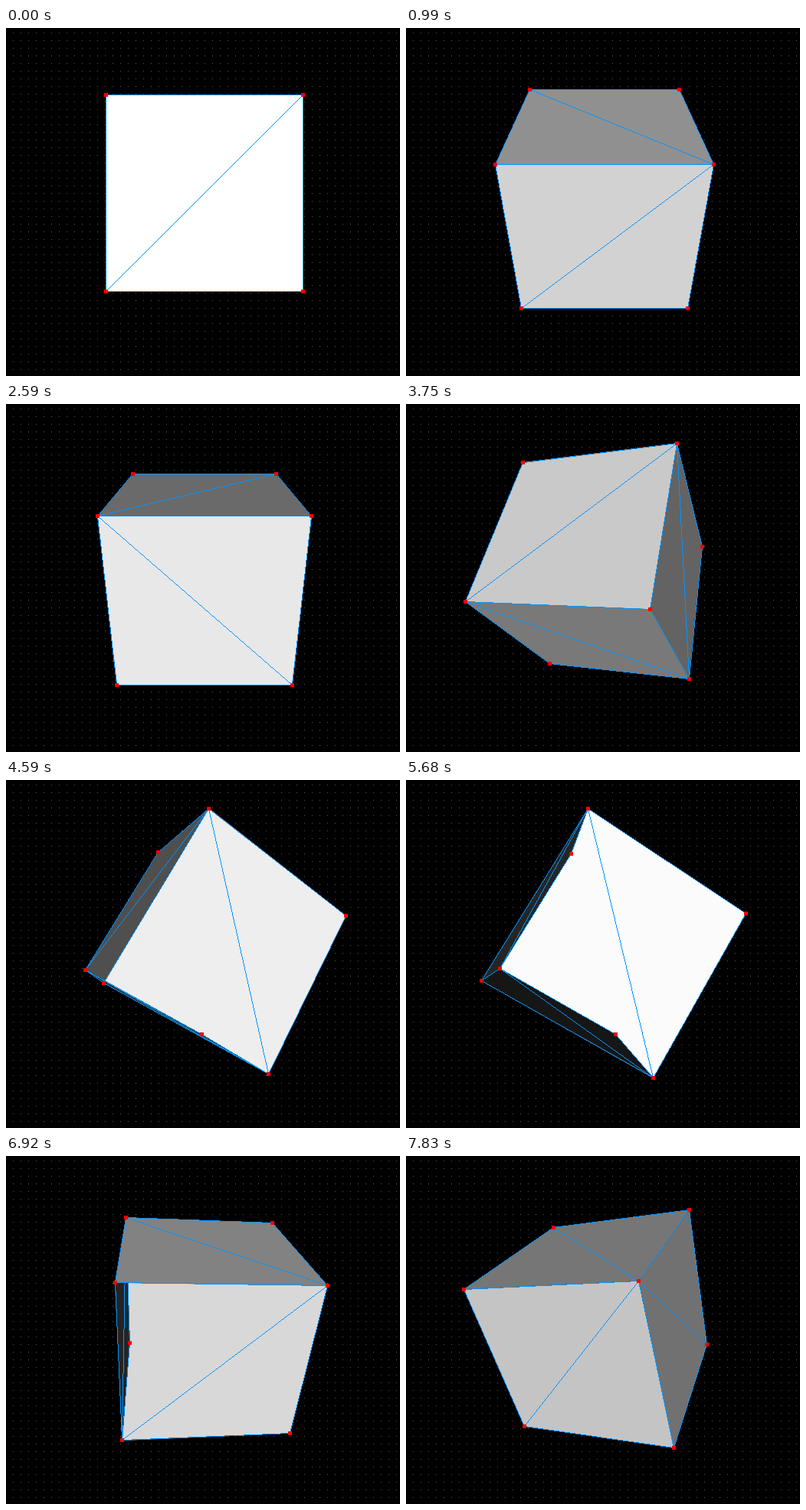
These frames come from a looping animation (514 by 455 pixels, 8000 ms). An HTML page with a canvas:

```html
<!DOCTYPE html>
<html lang="en">
<head>
<meta charset="utf-8">
<title>Rotating cube</title>
<style>
html, body { margin: 0; width: 100%; height: 100%; overflow: hidden; background: #000; }
canvas { display: block; width: 514px; height: 455px; }
</style>
</head>
<body>
<canvas id="stage" width="514" height="455"></canvas>
<script>
const ctx = document.getElementById('stage').getContext('2d');
const W = 514, H = 455, LOOP = 8000;
const FOCAL = W, DISTANCE = 5, CX = 259, CY = 215.9;
const LINE = '#0094ff', HANDLE = '#ff0000', DOT = '#585858';

// The cube turns in key presses: first about x, then about y
const STEP = 0.2, TILT_STEPS = 13, TICK = 80;
const burst = (start, ticks = 1, presses = ticks) => ({ start, ticks, presses });
const bursts = [
  burst(500, 2), burst(990), burst(1250, 2), burst(2010, 2, 3), burst(2420), burst(2590, 4),
  burst(3750, 1, 2), burst(4000), burst(4260), burst(4590, 1, 2),
  burst(5680, 2, 3), burst(6590, 5, 6), burst(7750, 2, 3)
];

function pressesAt(t) {
  return bursts.reduce((sum, { start, ticks, presses }) => {
    const done = Math.floor((t - start) / TICK) + 1;
    return sum + Math.floor(presses * Math.max(0, Math.min(1, done / ticks)));
  }, 0);
}

function makeFace(axis, side) {
  const point = (u, v) => {
    const p = [0, 0, 0];
    p[axis] = side;
    p[(axis + 1) % 3] = u;
    p[(axis + 2) % 3] = v;
    return p;
  };
  // Start the ring on a corner whose signs multiply to +1: the diagonal joins corners 0 and 2
  return { normal: point(0, 0), ring: [point(1, side), point(1, -side), point(-1, -side), point(-1, side)] };
}

// Painted in this order: front, right, back, left, top, bottom
const faces = [[2, 0], [1]].flatMap(axes =>
  [1, -1].flatMap(side => axes.map(axis => makeFace(axis, side))));

function rotate([x, y, z], ax, ay) {
  const cx = Math.cos(ax), sx = Math.sin(ax), cy = Math.cos(ay), sy = Math.sin(ay);
  const y1 = y * cx - z * sx, z1 = y * sx + z * cx;
  return [x * cy - z1 * sy, y1, x * sy + z1 * cy];
}

function project([x, y, z]) {
  const scale = FOCAL / (DISTANCE - z);
  return [CX + x * scale, CY - y * scale];
}

// One-pixel line without smoothing
function line(a, b) {
  const [x0, y0] = a.map(Math.floor), [x1, y1] = b.map(Math.floor);
  const n = Math.max(Math.abs(x1 - x0), Math.abs(y1 - y0), 1);
  ctx.fillStyle = LINE;
  for (let i = 0; i <= n; i++) {
    ctx.fillRect(Math.round(x0 + (x1 - x0) * i / n), Math.round(y0 + (y1 - y0) * i / n), 1, 1);
  }
}

function drawGrid() {
  ctx.fillStyle = '#000';
  ctx.fillRect(0, 0, W, H);
  ctx.fillStyle = DOT;
  for (let y = 6; y < 450; y += 10) {
    for (let x = 9; x < W; x += 10) ctx.fillRect(x, y, 1, 1);
  }
}

function drawFace({ light, points }) {
  const v = Math.round(255 * light);
  ctx.fillStyle = `rgb(${v},${v},${v})`;
  ctx.beginPath();
  points.forEach(p => ctx.lineTo(p[0], p[1]));
  ctx.fill();
  points.forEach((p, i) => line(p, points[(i + 1) % 4]));
  line(points[0], points[2]);
}

function drawHandle([x, y]) {
  ctx.fillStyle = HANDLE;
  ctx.fillRect(Math.floor(x) - 2, Math.floor(y) - 2, 5, 5);
}

function drawCube(ax, ay) {
  const lit = faces.map(({ normal, ring }) => ({
    light: rotate(normal, ax, ay)[2],
    points: ring.map(p => project(rotate(p, ax, ay)))
  })).filter(face => face.light > 0.001);
  lit.forEach(drawFace);
  lit.forEach(face => face.points.forEach(drawHandle));
}

function render(now) {
  const presses = pressesAt(now % LOOP);
  const tilt = Math.min(presses, TILT_STEPS);
  drawGrid();
  drawCube(tilt * STEP, (presses - tilt) * STEP);
}

function tick() {
  render(performance.now());
  requestAnimationFrame(tick);
}
tick();
</script>
</body>
</html>
```
